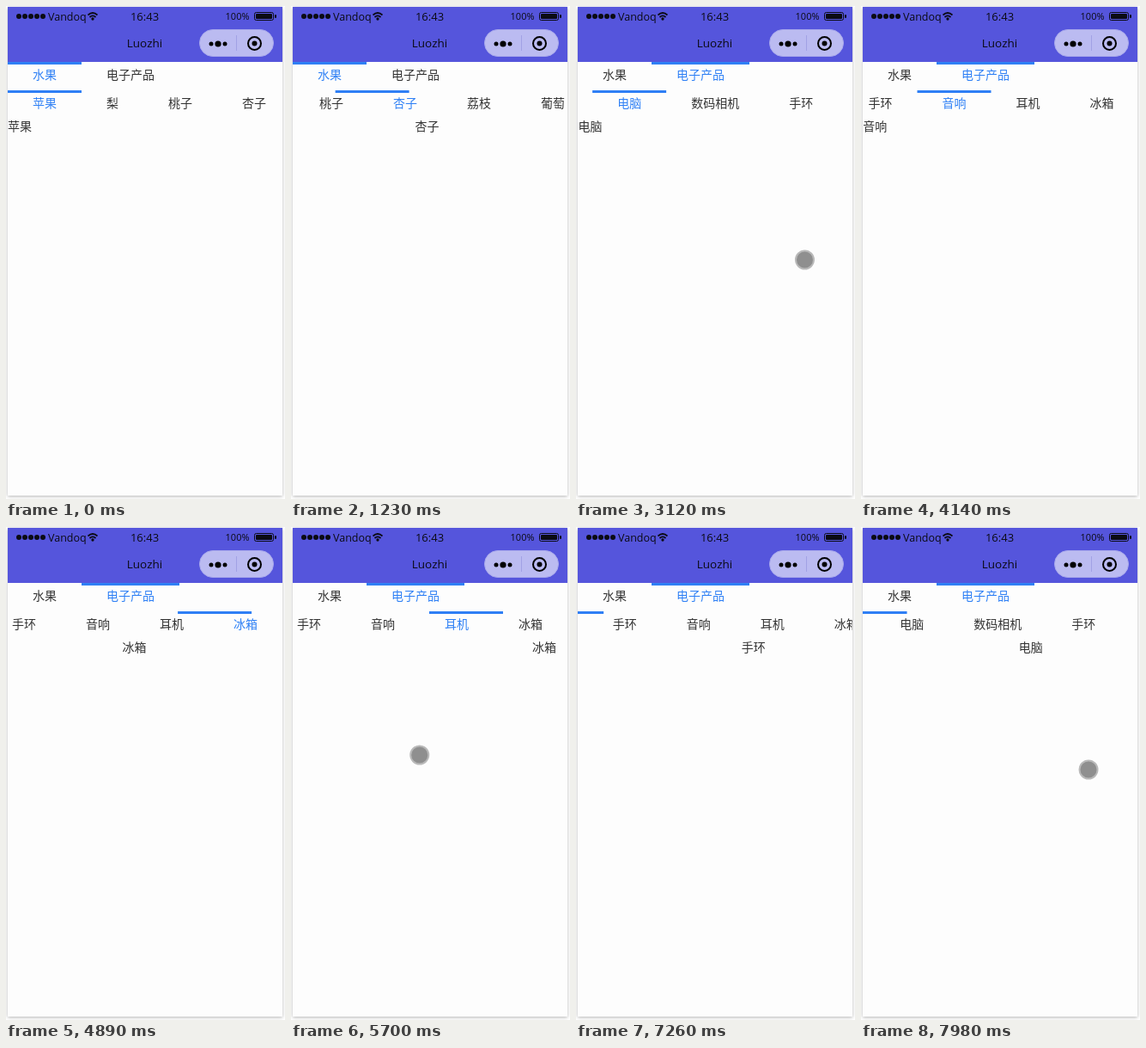
An HTML page that plays this animation: 325 by 573 pixels, repeating every 8 s.

```html
<!DOCTYPE html>
<html lang="zh">
<head>
<meta charset="utf-8">
<style>
  html, body { margin: 0; width: 100%; height: 100%; overflow: hidden; background: #fff; }
  .phone {
    position: absolute; left: 2px; top: 1px; width: 320px; height: 568px;
    background: #fdfdfd; box-shadow: 0 1px 4px rgba(0, 0, 0, .3);
  }
  svg { position: absolute; left: 0; top: 0; display: block; }
  .bar text { font-family: "Open Sans", "Noto Sans", sans-serif; fill: #0b0b14; }
  .cjk text { font: 300 14px "Noto Sans CJK SC", "Noto Sans CJK", sans-serif; fill: #333; }
  .cjk text.on { fill: #2f80f5; }
  .line { fill: #2f7ff5; }
</style>
</head>
<body>
<div class="phone"></div>
<svg width="325" height="573" viewBox="0 0 325 573">
  <clipPath id="screen"><rect x="2" y="1" width="320" height="568"/></clipPath>
  <g class="bar">
    <rect x="2" y="1" width="320" height="64" fill="#5555dc"/>
    <path d="M15 12h.01M22 12h.01M29 12h.01M36 12h.01M43 12h.01" stroke="#0b0b14" stroke-width="6" stroke-linecap="round"/>
    <text x="49" y="16.5" font-size="12.5">Vandoq</text>
    <g fill="none" stroke="#0b0b14" stroke-width="1.7">
      <path d="M95.5 10.5Q101 5.5 106.500 10.500M97.500 13Q101 9.800 104.500 13"/>
      <circle cx="101" cy="15" r=".8"/>
    </g>
    <text x="161.500" y="16.500" font-size="13" text-anchor="middle">16:43</text>
    <text x="283.500" y="16" font-size="11" text-anchor="end">100%</text>
    <rect x="289.500" y="7.500" width="22" height="9" rx="2" fill="none" stroke="#0b0b14"/>
    <rect x="291" y="9" width="19" height="6" rx="1" fill="#0b0b14"/>
    <rect x="313" y="10" width="2" height="4" rx="1" fill="#0b0b14"/>
    <text x="161.500" y="48" font-size="13.500" text-anchor="middle">Luozhi</text>
    <rect x="225.500" y="27.500" width="86" height="31" rx="15.500" fill="#bbbbf1" stroke="#a9a9ec"/>
    <path d="M268.500 34v18" stroke="#a2a2e4"/>
    <circle cx="239" cy="44" r="2.500"/>
    <circle cx="247" cy="44" r="3.600"/>
    <circle cx="255" cy="44" r="2.500"/>
    <circle cx="289.500" cy="43.500" r="7.500" fill="none" stroke="#000" stroke-width="2"/>
    <circle cx="289.500" cy="43.500" r="3"/>
  </g>
  <g class="cjk" clip-path="url(#screen)">
    <g id="top"></g>
    <g id="strip"></g>
    <g id="pages"></g>
  </g>
  <circle id="finger" r="10.500" fill="#8f8f8f" stroke="#b9b9b9" stroke-width="2"/>
</svg>
<script>
const LOOP = 8000, WIDTH = 320, LEFT = 2, PAD = 29;
const DRAG = 100, SETTLE = 560, SCROLL = 620, LINGER = 20, TOP_DELAY = 20, TOP_TIME = 300;
const groups = [
  ['苹果', '梨', '桃子', '杏子', '荔枝', '葡萄'],
  ['电脑', '数码相机', '手环', '音响', '耳机', '冰箱']
];

// touch time, finger x from, x to, y
const swipes = [
  [210, 205, 35, 349],
  [640, 200, 26, 343],
  [1080, 260, 86, 334],
  [1540, 245, 70, 331],
  [2120, 233, 62, 322],
  [2545, 250, 74, 312],
  [3119, 270, 94, 295],
  [3310, 240, 70, 297],
  [3500, 272, 98, 295],
  [4200, 238, 64, 297],
  [4760, 270, 95, 290],
  [5350, 80, 256, 263],
  [5699, 147, 285, 265],
  [6420, 68, 240, 270],
  [7128, 85, 259, 272],
  [7320, 105, 275, 284],
  [7865, 81, 265, 282]
].map(([t, x0, x1, y]) => ({ t, x0, x1, y, up: t + DRAG }));

const $ = id => document.getElementById(id);
const clamp = v => Math.max(0, Math.min(1, v));
const mix = (a, b, k) => a + (b - a) * k;
const easeOut = k => 1 - (1 - clamp(k)) ** 2;

function add(parent, tag, attrs, label = '') {
  const el = document.createElementNS('http://www.w3.org/2000/svg', tag);
  for (const name in attrs) el.setAttribute(name, attrs[name]);
  el.textContent = label;
  return parent.appendChild(el);
}

const tabWidth = label => label.length * 14 + PAD * 2;

function addTabs(parent, labels, x, y) {
  return labels.map(label => {
    const tab = { x, w: tabWidth(label), el: add(parent, 'text', { x: x + PAD, y }, label) };
    x += tab.w;
    return tab;
  });
}

const topTabs = addTabs($('top'), ['水果', '电子产品'], LEFT, 85);
const topLine = add($('top'), 'rect', { class: 'line', y: 65, height: 3 });

// both groups lie end to end on one strip
const tabs = [];
let end = 0;
for (const labels of groups) {
  const row = addTabs($('strip'), labels, end, 118);
  end += row.reduce((sum, tab) => sum + tab.w, 0);
  for (const tab of row) tab.scroll = Math.min(tab.x, end - WIDTH);
  tabs.push(...row);
}
const line = add($('strip'), 'rect', { class: 'line', y: 98, height: 3 });
groups.flat().forEach((label, i) => add($('pages'), 'text', { x: LEFT + i * WIDTH, y: 145 }, label));

const rest = { up: -LOOP, from: 0, to: 0, drop: 0, scroll: 0 };

const settled = (s, t) => mix(s.drop, s.to, easeOut((t - s.up) / SETTLE));
const scrolled = (s, t) => mix(s.scroll, tabs[s.to].scroll, easeOut((t - s.up) / SCROLL));

swipes.reduce((prev, s) => {
  s.from = prev.to;
  s.to = s.from + Math.sign(s.x0 - s.x1);
  s.start = settled(prev, s.t);
  s.drop = s.start + (s.x0 - s.x1) / WIDTH;
  s.scroll = scrolled(prev, s.up);
  return s;
}, rest);

const latest = test => swipes.filter(test).pop() || rest;

function setActive(list, index) {
  list.forEach((tab, i) => tab.el.classList.toggle('on', i === index));
}

function draw(t) {
  const touch = latest(s => s.t <= t);
  const done = latest(s => s.up <= t);
  const pull = clamp((t - touch.t) / DRAG);
  const page = touch === done ? settled(done, t) : mix(touch.start, touch.drop, pull);

  $('pages').setAttribute('transform', `translate(${-page * WIDTH})`);
  $('strip').setAttribute('transform', `translate(${LEFT - scrolled(done, t)})`);

  const i = Math.max(0, Math.min(tabs.length - 2, Math.floor(page)));
  const grow = easeOut((t - done.up) / SCROLL) ** 2;
  line.setAttribute('x', mix(tabs[i].x, tabs[i + 1].x, page - i));
  line.setAttribute('width', mix(tabs[done.from].w, tabs[done.to].w, grow));
  setActive(tabs, done.to);

  const cross = swipes.find(s => s.to === groups[0].length).up + TOP_DELAY;
  const k = easeOut((t - cross) / TOP_TIME);
  topLine.setAttribute('x', mix(topTabs[0].x, topTabs[1].x, k));
  topLine.setAttribute('width', mix(topTabs[0].w, topTabs[1].w, k));
  setActive(topTabs, t < cross ? 0 : 1);

  const shown = touch !== rest && t <= touch.up + LINGER;
  $('finger').style.display = shown ? '' : 'none';
  if (shown) {
    $('finger').setAttribute('cx', mix(touch.x0, touch.x1, pull));
    $('finger').setAttribute('cy', touch.y);
  }
}

const begin = performance.now();
function tick() {
  draw((performance.now() - begin) % LOOP);
  requestAnimationFrame(tick);
}
tick();
</script>
</body>
</html>
```
